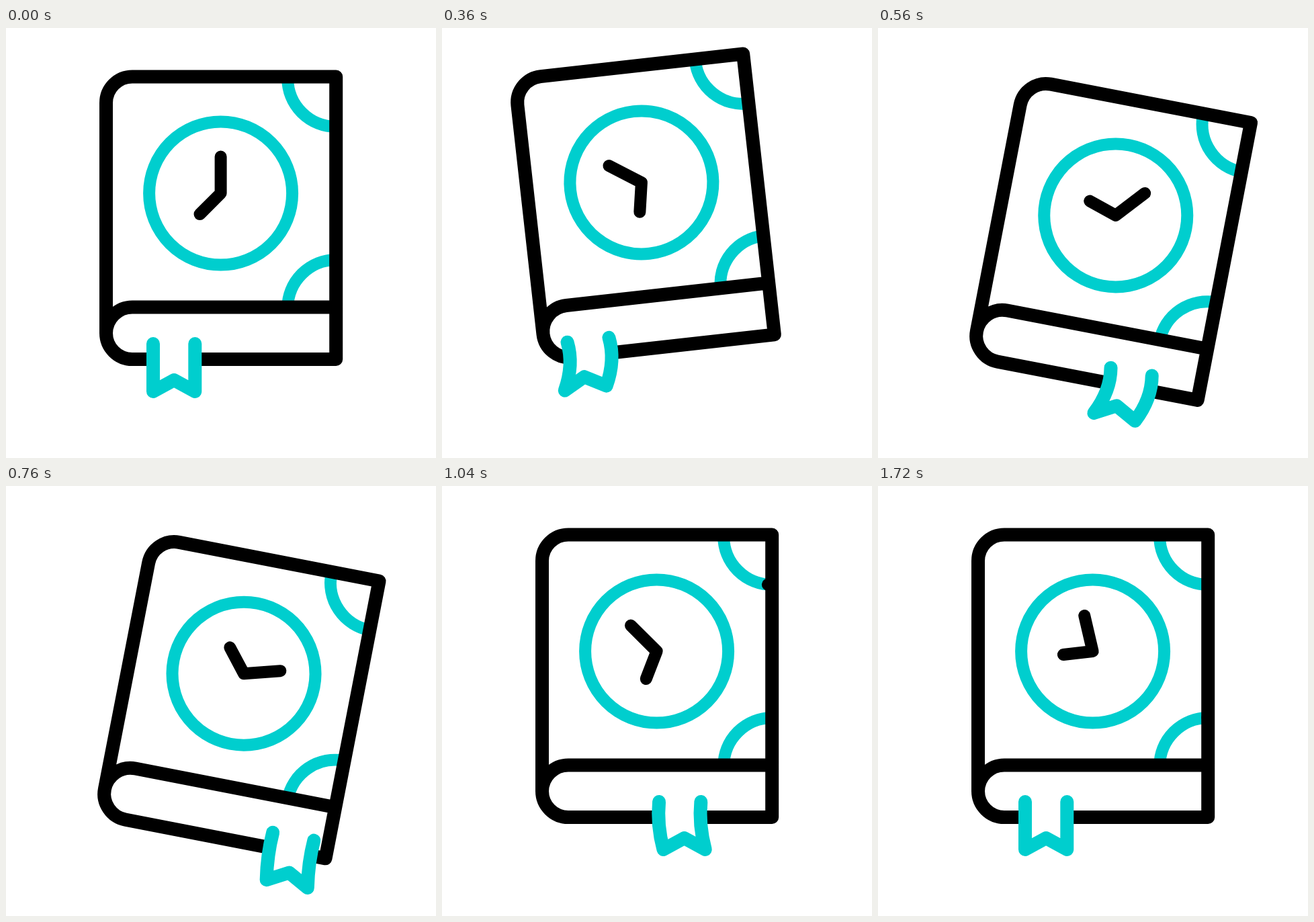
An HTML page with a canvas for the animation above (2.2 s loop, 640 by 640 pixels).

```html
<!DOCTYPE html>
<html lang="en">
<head>
<meta charset="utf-8">
<title>Book clock</title>
<style>
  html, body { margin: 0; width: 100%; height: 100%; overflow: hidden; background: #fff; }
  canvas { display: block; width: 100vw; height: 100vh; }
</style>
</head>
<body>
<canvas id="stage" width="640" height="640"></canvas>
<script>
const ctx = document.getElementById('stage').getContext('2d');
const BLACK = '#000';
const CYAN = '#00cece';
const LOOP = 2200;
const STEP = 40;
const REST = 1720;
const RAD = Math.PI / 180;

const pivot = { x: 164, y: 441.7 };
const clock = { x: 319.6, y: 246 };
const book = { left: 149, right: 491.2, top: 72.5, fold: 415.5, bottom: 493, radius: 39 };

// Eased progress from 0 to 1 between two times.
function ramp(t, from, to) {
  const u = Math.min(Math.max((t - from) / (to - from), 0), 1);
  return u * u * (3 - 2 * u);
}

// The book leans left, then right, then stands up; the other parts follow.
function poseAt(t) {
  const handSwing = 131.3 * ramp(t, 420, 628) - 119.9 * ramp(t, 760, 1040);
  return {
    tilt: -10 * ramp(t, 0, 267) + 24.1 * ramp(t, 267, 647) - 14.1 * ramp(t, 647, 1018),
    slide: -35.5 * ramp(t, 0, 240) + 223.5 * ramp(t, 410, 628) - 188 * ramp(t, 800, 1317),
    sway: 6 * ramp(t, 0, 110) - 18 * ramp(t, 110, 380) + 18.4 * ramp(t, 620, 800)
      - 16.6 * ramp(t, 1040, 1360) + 10.2 * ramp(t, 1360, 1650),
    longHand: handSwing - 56.5 * ramp(t, 0, 270) + 32 * ramp(t, 1040, 1360),
    shortHand: 225 + handSwing - 35.3 * ramp(t, 0, 270) + 62.3 * ramp(t, 1040, 1400),
    sweepHead: 180 * ramp(t, 980, 1581),
    sweepTail: 180 * ramp(t, 1176, 1739)
  };
}

function stroke(color, width, build) {
  ctx.strokeStyle = color;
  ctx.lineWidth = width;
  ctx.beginPath();
  build();
  ctx.stroke();
}

// The upper arc runs from the right edge leftwards, the lower one back to the right.
function cornerArc(lower, from, to, color) {
  if (to <= from) return;
  const base = lower ? 180 : 90;
  stroke(color, 18, () =>
    ctx.arc(book.right, lower ? 417 : 75, 72, (base + from) * RAD, (base + to) * RAD));
}

function drawCorners({ sweepHead, sweepTail }) {
  ctx.save();
  ctx.beginPath();
  ctx.rect(book.left, book.top, book.right - book.left, book.fold - book.top);
  ctx.clip();
  for (const lower of [false, true]) {
    const offset = lower ? 90 : 0;
    cornerArc(lower, 0, 90, CYAN);
    cornerArc(lower, Math.max(sweepTail - offset, 0), Math.min(sweepHead - offset, 90), BLACK);
  }
  ctx.restore();
}

function drawBook() {
  const { left, right, top, fold, bottom, radius } = book;
  stroke(BLACK, 20, () => {
    ctx.moveTo(right, top);
    ctx.arcTo(left, top, left, bottom, radius);
    ctx.arcTo(left, bottom, right, bottom, radius);
    ctx.lineTo(right, bottom);
    ctx.closePath();
    ctx.moveTo(right, fold);
    ctx.arcTo(left, fold, left, bottom, radius);
  });
}

function drawClock({ longHand, shortHand }) {
  stroke(CYAN, 18, () => ctx.arc(clock.x, clock.y, 106.5, 0, 360 * RAD));
  const tip = (angle, length) => [
    clock.x + length * Math.sin(angle * RAD),
    clock.y - length * Math.cos(angle * RAD)
  ];
  stroke(BLACK, 18, () => {
    ctx.moveTo(...tip(longHand, 54.5));
    ctx.lineTo(clock.x, clock.y);
    ctx.lineTo(...tip(shortHand, 44));
  });
}

function drawRibbon({ slide, sway }) {
  const left = 219 + slide;
  const right = left + 62.3;
  const bend = 0.35 * sway;
  stroke(CYAN, 20, () => {
    ctx.moveTo(left, 470);
    ctx.bezierCurveTo(left - bend, 493, left, 517, left + sway, 541);
    ctx.lineTo((left + right) / 2 + sway, 524);
    ctx.lineTo(right + sway, 541);
    ctx.bezierCurveTo(right, 517, right - bend, 493, right, 470);
    ctx.fillStyle = '#fff';
    ctx.fill();
  });
}

function draw(t) {
  const pose = poseAt(t);
  ctx.setTransform(1, 0, 0, 1, 0, 0);
  ctx.fillStyle = '#fff';
  ctx.fillRect(0, 0, 640, 640);
  ctx.lineCap = ctx.lineJoin = 'round';
  ctx.translate(pivot.x, pivot.y);
  ctx.rotate(pose.tilt * RAD);
  ctx.translate(-pivot.x, -pivot.y);
  drawCorners(pose);
  drawBook();
  drawClock(pose);
  drawRibbon(pose);
}

let start = null;
function tick(now) {
  if (start === null) start = now;
  const t = (now - start + 1) % LOOP;
  draw(Math.min(Math.floor(t / STEP) * STEP, REST));
  requestAnimationFrame(tick);
}

draw(0);
requestAnimationFrame(tick);
</script>
</body>
</html>
```
